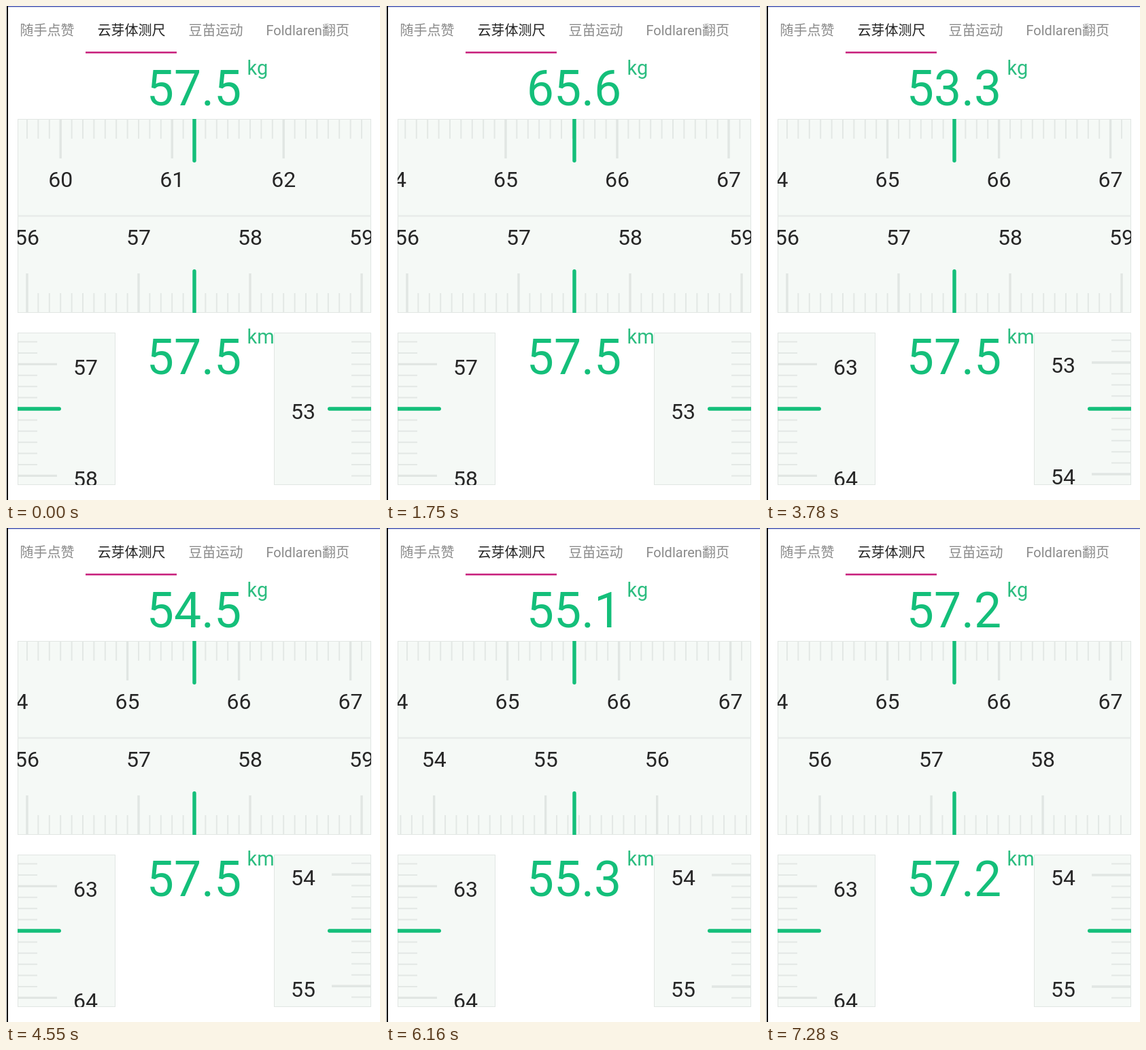
These frames come from a looping animation (550 px wide and 726 px high, 7350 ms). An HTML page:

```html
<!DOCTYPE html>
<html lang="zh">
<head>
<meta charset="utf-8">
<title>Rulers</title>
<style>
html, body { margin: 0; width: 100%; height: 100%; overflow: hidden; background: #fff; }
svg { display: block; }
text { font-family: Roboto, "Noto Sans CJK SC", "Noto Sans CJK", sans-serif; }
.tab { font-size: 20px; fill: #8a8a8a; }
.on { fill: #222; }
.num { font-size: 32px; fill: #262626; text-anchor: middle; }
.big { font-size: 71.5px; fill: #14bf7a; text-anchor: middle; }
.unit { font-size: 29px; fill: #2cbd80; }
.minor { stroke: #e3e8e5; stroke-width: 2; }
.major { stroke: #e1e6e3; stroke-width: 3.4; }
.panel { fill: #f5f9f6; stroke: #e1e6e3; }
.mark { fill: #14bf7a; }
</style>
</head>
<body>
<svg id="stage" width="550" height="726" viewBox="0 0 550 726">
  <rect width="550" height="726" fill="#fff"/>
  <rect x="3" width="547" height="1" fill="#3f4fb0"/>
  <rect x="3" y="1" width="547" height="1" fill="#b4bade"/>
  <rect x="1" width="2" height="726" fill="#000"/>
  <text class="tab" x="20.5" y="43">随手点赞</text>
  <text class="tab on" x="134.5" y="43">云芽体测尺</text>
  <text class="tab" x="268.5" y="43">豆苗运动</text>
  <text class="tab" x="382.5" y="43">Foldlaren翻页</text>
  <rect x="117" y="67" width="134" height="2.6" fill="#c9247f"/>
  <g id="rulers"></g>
  <text class="big" id="kg" x="276.5" y="146"></text>
  <text class="unit" x="354.5" y="101">kg</text>
  <text class="big" id="km" x="276.5" y="541"></text>
  <text class="unit" x="354.5" y="496">km</text>
</svg>
<script>
const LOOP = 7350, STEP = 70, UNIT = 164, BASE = 50, LAST = 70;
const NS = 'http://www.w3.org/2000/svg';

// Each stop: time, value, and how sharply the move towards it slows down
const tracks = {
  top: [[490, 61.2], [1750, 65.616, 2.8], [1890, 65.6, 2]],
  left: [[2070, 57.4], [3010, 63.336, 2.3], [3150, 63.4, 2]],
  right: [[3620, 53], [4550, 54.505, 2.5], [4620, 54.5, 2]],
  bottom: [[4690, 57.5], [5950, 54.5, 2.76], [6020, 54.5, 1], [7350, 57.207, 4.73]]
};

// Ruler whose value is shown in kg from the given time on
const shown = [[0, 'bottom'], [560, 'top'], [2100, 'left'], [3640, 'right'], [4760, 'bottom']];

// Panel box, tick edge and direction, label place, pointer position
const layout = {
  top: { x: 17, y: 166, w: 520, h: 142.5, edge: 166, dir: 1, label: 266, at: 277 },
  bottom: { x: 17, y: 308.5, w: 520, h: 142.5, edge: 451, dir: -1, label: 351, at: 277 },
  left: { x: 17, y: 480, w: 144, h: 224, edge: 17, dir: 1, label: 117, at: 592, upright: true },
  right: { x: 394, y: 480, w: 143, h: 224, edge: 537, dir: -1, label: 437, at: 592, upright: true }
};

function add(parent, tag, attrs, text) {
  const el = document.createElementNS(NS, tag);
  for (const k in attrs) el.setAttribute(k, attrs[k]);
  if (text !== undefined) el.textContent = text;
  return parent.appendChild(el);
}

function buildRuler(r) {
  const root = document.getElementById('rulers');
  add(root, 'rect', { class: 'panel', x: r.x + .5, y: r.y + .5, width: r.w - 1, height: r.h - 1 });
  const view = add(root, 'svg', {
    x: r.x, y: r.y, width: r.w, height: r.h, viewBox: [r.x, r.y, r.w, r.h].join(' ')
  });
  const strip = add(view, 'g', {});
  const paths = { minor: '', major: '' };
  for (let i = 0; i <= (LAST - BASE) * 10; i++) {
    const pos = (i * UNIT / 10).toFixed(1);
    const major = i % 10 === 0;
    const len = r.dir * (major ? 58 : 29);
    paths[major ? 'major' : 'minor'] += r.upright ? `M${r.edge} ${pos}h${len}` : `M${pos} ${r.edge}v${len}`;
    if (major) {
      const place = r.upright ? { x: r.label, y: +pos + 15.4 } : { x: pos, y: r.label };
      add(strip, 'text', { class: 'num', ...place }, BASE + i / 10);
    }
  }
  for (const k in paths) add(strip, 'path', { class: k, d: paths[k] });

  // The pointer reaches past the edge so only its inner end looks round
  const start = r.dir > 0 ? r.edge - 6 : r.edge - 64;
  add(view, 'rect', r.upright
    ? { class: 'mark', x: start, y: r.at - 2.7, width: 70, height: 5.4, rx: 2.7 }
    : { class: 'mark', x: r.at - 2.7, y: start, width: 5.4, height: 70, rx: 2.7 });
  return strip;
}

function valueAt(name, t) {
  const stops = tracks[name];
  let [t0, v0] = stops[0];
  if (t <= t0) return v0;
  for (const [t1, v1, k] of stops.slice(1)) {
    if (t < t1) {
      const p = (t - t0) / (t1 - t0);
      return v1 + (v0 - v1) * (1 - p ** 1.2) ** k;
    }
    t0 = t1;
    v0 = v1;
  }
  return v0;
}

const strips = {};
for (const name in layout) strips[name] = buildRuler(layout[name]);
const kg = document.getElementById('kg');
const km = document.getElementById('km');

function draw(t) {
  for (const name in layout) {
    const { at, upright } = layout[name];
    const shift = (at - (valueAt(name, t) - BASE) * UNIT).toFixed(2);
    strips[name].setAttribute('transform', upright ? `translate(0 ${shift})` : `translate(${shift} 0)`);
  }
  const source = shown.filter(s => s[0] <= t).pop()[1];
  kg.textContent = valueAt(source, t - 30).toFixed(1);
  km.textContent = valueAt('bottom', t).toFixed(1);
}

const begin = performance.now();
function frame() {
  const t = (performance.now() - begin) % LOOP;
  draw(Math.floor(t / STEP) * STEP);
  requestAnimationFrame(frame);
}
draw(0);
requestAnimationFrame(frame);
</script>
</body>
</html>
```
